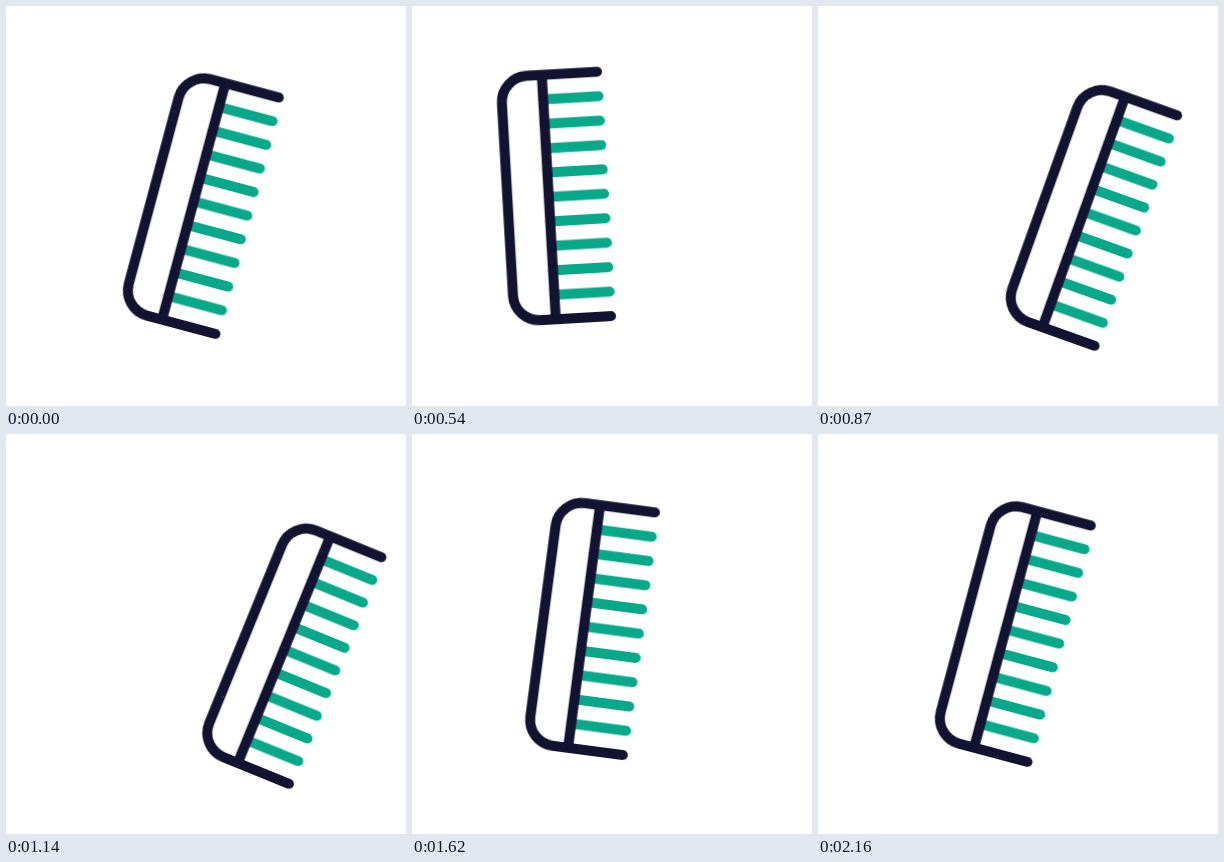
Animation of 400x400 px, one loop 2.28 s. Source, as an HTML page without scripts:

```html
<!DOCTYPE html>
<html lang="en">
<head>
<meta charset="utf-8">
<title>Comb</title>
<style>
  html, body { margin: 0; width: 100%; height: 100%; overflow: hidden; background: #fff; }

  /* The zero-size box is the pivot: the foot of the comb's inner bar */
  .comb {
    position: absolute; left: 0; top: 0; width: 0; height: 0;
    offset-path: path("M157.3 314L115 333.5C153 299 195 296 238 330.5L157.3 314");
    offset-rotate: 0deg;
    animation: stroke 2.28s cubic-bezier(.333, 0, .667, 1) infinite,
               tilt 2.28s cubic-bezier(.333, 0, .667, 1) infinite;
  }
  @keyframes stroke {
    0% { offset-distance: 0%; }
    12.9% { offset-distance: 17.55%; }
    44.8%, 46.7% { offset-distance: 68.96%; }
    68.7%, 100% { offset-distance: 100%; }
  }
  @keyframes tilt {
    0%, 94.7%, 100% { transform: rotate(15deg); }
    14.5%, 15.8% { transform: rotate(-10deg); }
    42.8%, 55.9% { transform: rotate(22.2deg); }
    69.1% { transform: rotate(7.4deg); }
  }

  svg { position: absolute; left: 0; top: 0; width: 1px; height: 1px; overflow: visible; }
  path { fill: none; stroke-width: 10; stroke-linecap: round; stroke-linejoin: round; }
  .tooth { stroke: #08a88a; }
  .frame { stroke: #121331; }
</style>
</head>
<body>
<div class="comb">
  <svg viewBox="0 0 1 1">
    <g id="trio">
      <path id="tooth" class="tooth" d="M-1.3-220.3H54"/>
      <use href="#tooth" y="24.47"/>
      <use href="#tooth" y="48.94"/>
    </g>
    <use href="#trio" y="73.41"/>
    <use href="#trio" y="146.82"/>
    <path class="frame" d="M54-244.7H-16.7a26 26 0 0 0-26 26V-26a26 26 0 0 0 26 26H54M-1.3-244.7V0"/>
  </svg>
</div>
</body>
</html>
```
